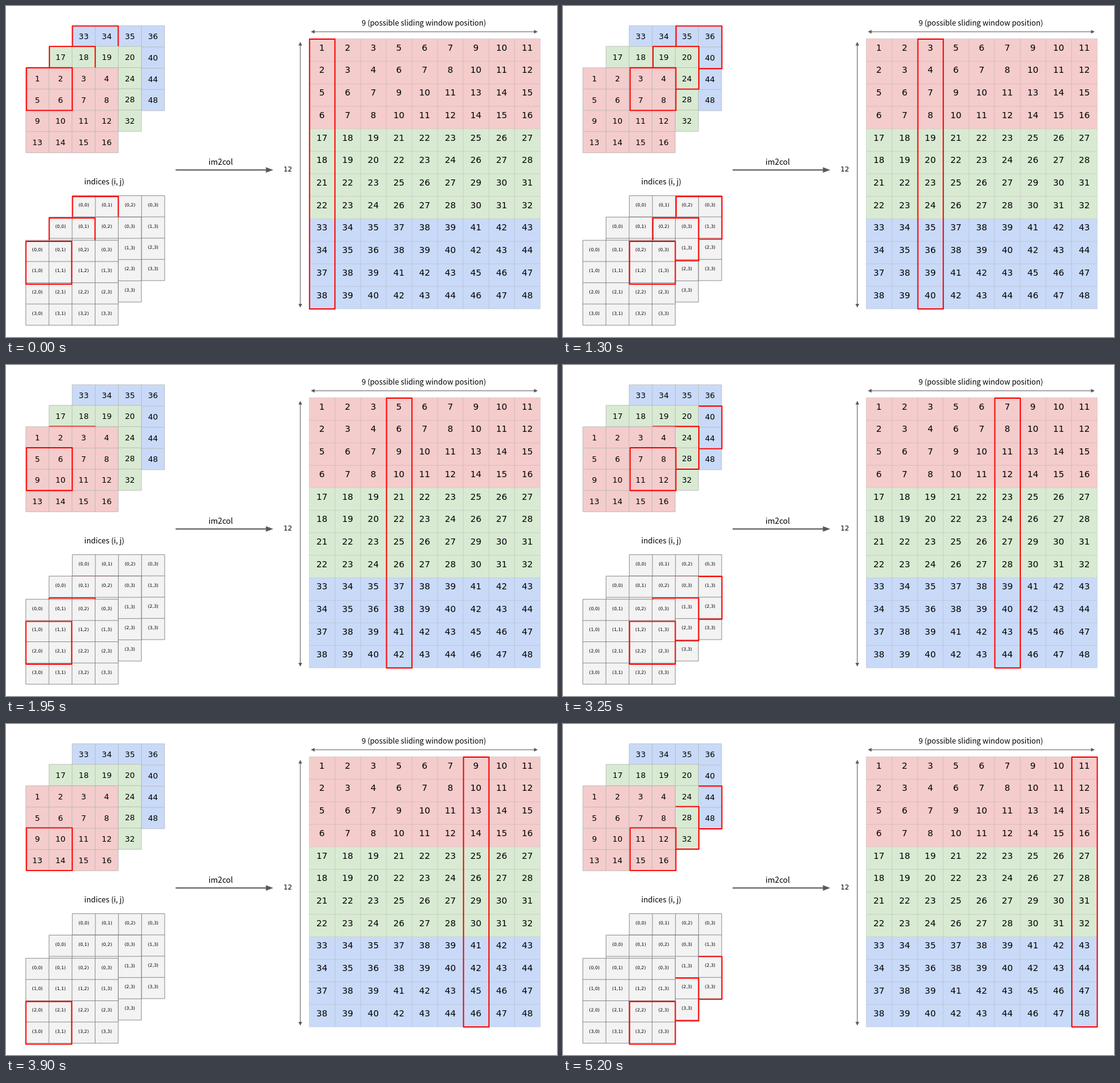
Recreate the animation shown at these times as an HTML page with a canvas. Size 900x540 px, loop 5.85 s.

```html
<!DOCTYPE html>
<html lang="en">
<head>
<meta charset="utf-8">
<title>im2col</title>
<style>
  html, body { margin: 0; width: 100%; height: 100%; overflow: hidden; background: #fff; }
  canvas { display: block; }
</style>
</head>
<body>
<canvas id="stage" width="900" height="540"></canvas>
<script>
const ctx = document.getElementById('stage').getContext('2d');
const STEP_MS = 650, POSITIONS = 9;
const LABEL_FONT = '"Noto Sans CJK JP", "Noto Sans CJK", "Noto Sans", sans-serif';
const NUMBER_FONT = '"DejaVu Sans", sans-serif';
const COLORS = ['#f4cccc', '#d9ead3', '#c9daf8'];

// Layers run front to back; box is the window's corner at row 0, column 0.
const channels = [
  { x: 32.4, y: 100.8, box: [33.4, 100.7] },
  { x: 70.3, y: 65.8, box: [70.9, 65.9] },
  { x: 108.1, y: 32.2, box: [108.5, 32.6] }
];
const indexLayers = [
  { x: 32.4, y: 382.2, box: [32.5, 384] },
  { x: 70.3, y: 344.4, box: [70.6, 345.8] },
  { x: 108.3, y: 309.4, box: [108.6, 310.7] }
];
const matrix = { x: 495.3, y: 53.5, w: 41.92, h: 36.72 };

function text(str, x, middle, size, font = NUMBER_FONT) {
  ctx.font = `${size}px ${font}`;
  ctx.textAlign = 'center';
  ctx.fillStyle = '#000';
  ctx.fillText(str, x, middle + size * 0.365);
}

function line(x1, y1, x2, y2, color, width) {
  ctx.strokeStyle = color;
  ctx.lineWidth = width;
  ctx.beginPath();
  ctx.moveTo(x1, y1);
  ctx.lineTo(x2, y2);
  ctx.stroke();
}

function redBox(x, y, w, h) {
  ctx.strokeStyle = '#f00';
  ctx.lineWidth = 1.9;
  ctx.lineJoin = 'round';
  ctx.strokeRect(x, y, w, h);
}

function gridLines(x, y, cols, rows, w, h, color, width) {
  for (let c = 0; c <= cols; c++) line(x + c * w, y, x + c * w, y + rows * h, color, width);
  for (let r = 0; r <= rows; r++) line(x, y + r * h, x + cols * w, y + r * h, color, width);
}

function arrowHead(x, y, angle, length, half) {
  ctx.save();
  ctx.translate(x, y);
  ctx.rotate(angle);
  ctx.fillStyle = '#595959';
  ctx.beginPath();
  ctx.moveTo(0, 0);
  ctx.lineTo(-length, -half);
  ctx.lineTo(-length, half);
  ctx.fill();
  ctx.restore();
}

function layerGrid(layer, style, label, row, col) {
  const w = 37.72, h = 34.65;
  ctx.fillStyle = style.fill;
  ctx.fillRect(layer.x, layer.y, 4 * w, 4 * h);
  gridLines(layer.x, layer.y, 4, 4, w, h, style.line, style.width);
  for (let r = 0; r < 4; r++)
    for (let c = 0; c < 4; c++)
      text(label(r, c), layer.x + (c + 0.5) * w, layer.y + (r + 0.5) * h + style.shift, style.size);
  redBox(layer.box[0] + 38.1 * col, layer.box[1] + 34.35 * row, 74.8, 69.7);
}

function drawMatrix(step) {
  const { x, y, w, h } = matrix;
  COLORS.forEach((color, i) => {
    ctx.fillStyle = color;
    ctx.fillRect(x, y + 4 * i * h, POSITIONS * w, 4 * h);
  });
  gridLines(x, y, POSITIONS, 12, w, h, 'rgba(140,140,140,.3)', 0.8);
  for (let q = 0; q < 12; q++)
    for (let k = 0; k < POSITIONS; k++) {
      const row = Math.floor(k / 3) + (q % 4 >> 1);
      const col = k % 3 + q % 2;
      text(16 * (q >> 2) + 4 * row + col + 1, x + (k + 0.5) * w - 0.2, y + q * h + 14, 14.2);
    }
  redBox(x + step * w + 0.5, y + 0.5, w - 0.4, 12 * h - 0.4);
}

function drawLabels() {
  text('9 (possible sliding window position)', 682.5, 28, 12.2, LABEL_FONT);
  text('im2col', 350.7, 254.7, 12.8, LABEL_FONT);
  text('indices (i, j)', 160.5, 286, 12.5, LABEL_FONT);
  text('12', 460.3, 266, 11.2);

  line(277, 267.5, 426, 267.5, '#595959', 1.9);
  arrowHead(436.5, 267.5, 0, 12, 4.5);
  line(502, 42, 864, 42, '#595959', 1);
  arrowHead(868.5, 42, 0, 6, 3);
  arrowHead(498, 42, Math.PI, 6, 3);
  line(480.7, 63, 480.7, 488, '#595959', 1);
  arrowHead(480.7, 58.5, -Math.PI / 2, 6, 3);
  arrowHead(480.7, 492, Math.PI / 2, 6, 3);
}

function draw(step) {
  const row = Math.floor(step / 3), col = step % 3;
  ctx.fillStyle = '#fff';
  ctx.fillRect(0, 0, 900, 540);
  for (let i = 2; i >= 0; i--) {
    layerGrid(channels[i],
      { fill: COLORS[i], line: '#b7b7b7', width: 0.8, size: 12.8, shift: 0.3 },
      (r, c) => 16 * i + 4 * r + c + 1, row, col);
    layerGrid(indexLayers[i],
      { fill: '#f3f3f3', line: '#777', width: 0.8, size: 7.3, shift: -2.5 },
      (r, c) => `(${r},${c})`, row, col);
  }
  drawMatrix(step);
  drawLabels();
}

function tick() {
  draw(Math.floor(performance.now() / STEP_MS) % POSITIONS);
  requestAnimationFrame(tick);
}
tick();
</script>
</body>
</html>
```
